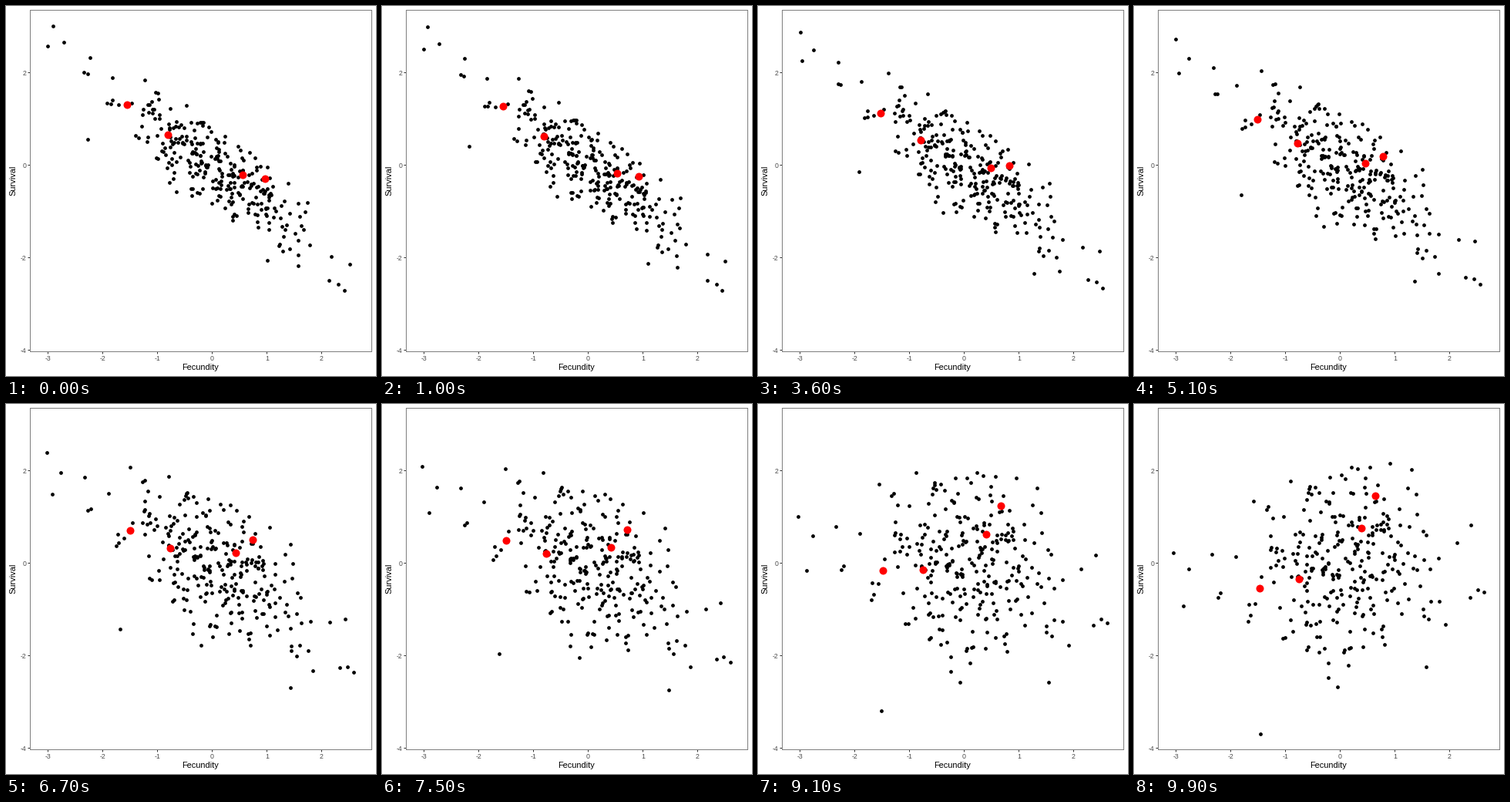
A matplotlib script that plays this animation: 480x480 px, repeating every 10 s.

```python
import numpy as np
import matplotlib.pyplot as plt
from matplotlib.animation import FuncAnimation

plt.rcParams["font.family"] = "Liberation Sans"

SIZE, DPI = 480, 72
FRAMES, INTERVAL = 100, 100
LEFT, RIGHT, TOP, BOTTOM = 31, 474, 5, 448
X0, Y0, X_UNIT, Y_UNIT = 267.3, 206.4, 71, 60
STRETCH = 4.2  # long to short axis of the cloud
TOTAL, RADIUS = 296, 2.35

# Uncorrelated positions: highlighted points, lone outliers, seeded cloud
marked = np.array([(-1.47, -.55), (-.75, -.35), (.39, .75), (.65, 1.45)])
outliers = np.array([
    (-3.04, .23), (-2.87, -.93), (-2.76, -.12), (-1.46, -3.70),
    (-.04, -2.67), (-.21, -2.48), (1.58, -2.25), (1.31, 2.03),
    (2.39, .82), (2.38, -.75), (2.51, -.58), (2.63, -.63),
])
rng = np.random.default_rng(12)
core = rng.normal(size=(2 * TOTAL, 2))
core = core[np.hypot(*core.T) < RADIUS][:TOTAL - len(outliers)]
cloud = np.vstack([outliers, core])


def turn(points, angle):
    """Rotate the stretched cloud, then scale both axes to unit spread."""
    c, s = np.cos(angle), np.sin(angle)
    u, v = STRETCH * points[:, 0], points[:, 1]
    x = (c * u + s * v) / np.hypot(STRETCH * c, s)
    y = (c * v - s * u) / np.hypot(STRETCH * s, c)
    return np.column_stack([x, y])


fig = plt.figure(figsize=(SIZE / DPI, SIZE / DPI), dpi=DPI, facecolor="white")
ax = fig.add_axes([LEFT / SIZE, 1 - BOTTOM / SIZE,
                   (RIGHT - LEFT) / SIZE, (BOTTOM - TOP) / SIZE])
ax.set_xlim((LEFT - X0) / X_UNIT, (RIGHT - X0) / X_UNIT)
ax.set_ylim((Y0 - BOTTOM) / Y_UNIT, (Y0 - TOP) / Y_UNIT)

xticks, yticks = range(-3, 3), range(-4, 3, 2)
ax.set_xticks(xticks, [str(t) for t in xticks])
ax.set_yticks(yticks, [str(t) for t in yticks])
ax.tick_params(length=3, width=1, pad=2, color="#333333",
               labelcolor="#4d4d4d", labelsize=8.8)
for spine in ax.spines.values():
    spine.set(color="#7f7f7f", linewidth=1)

mid_x, mid_y = (LEFT + RIGHT) / 2 / SIZE, 1 - (TOP + BOTTOM) / 2 / SIZE
label = dict(fontsize=11, color="black", ha="center", va="center")
fig.text(mid_x, 1 - 469.5 / SIZE, "Fecundity", **label)
fig.text(9.5 / SIZE, mid_y, "Survival", rotation=90, **label)


def dots(color, diameter, order):
    return ax.scatter([], [], s=diameter ** 2, color=color, linewidths=0,
                      zorder=order)


blacks, reds = dots("black", 4.8, 2), dots("red", 10, 3)


def draw(i):
    angle = np.pi / 4 * (1 - i / (FRAMES - 1))
    blacks.set_offsets(turn(cloud, angle))
    reds.set_offsets(turn(marked, angle))
    return blacks, reds


anim = FuncAnimation(fig, draw, frames=FRAMES, interval=INTERVAL,
                     repeat=True, repeat_delay=0)
plt.show()
```
